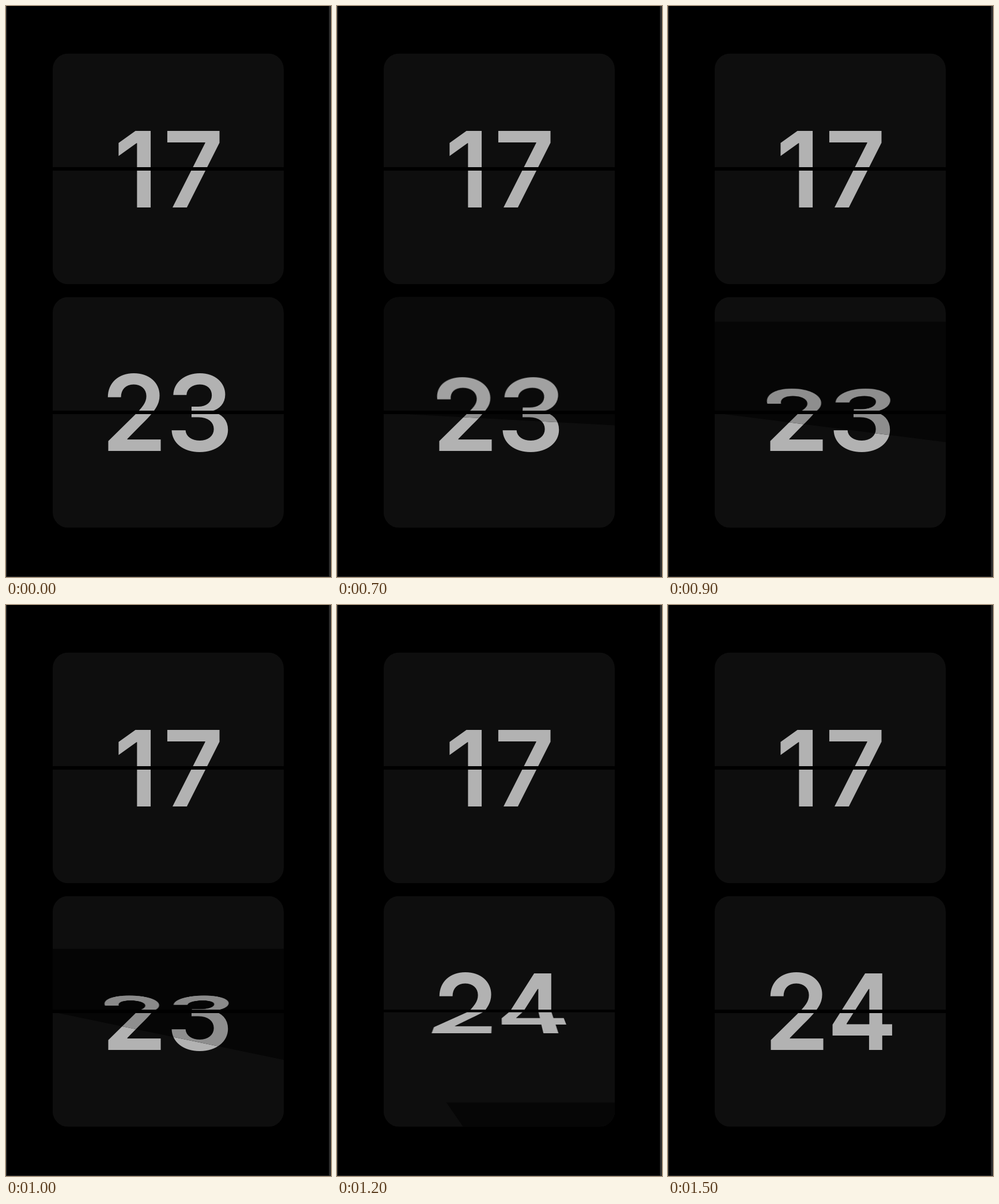
These frames come from a looping animation (564x992 px, 2 s). An HTML page with a canvas:

```html
<!DOCTYPE html>
<html lang="en">
<head>
<meta charset="utf-8">
<title>Flip clock</title>
<style>
  html, body { margin: 0; width: 100%; height: 100%; overflow: hidden; background: #000; }
  canvas { display: block; }
</style>
</head>
<body>
<canvas id="stage" width="564" height="992"></canvas>
<script>
const W = 564, H = 992, LOOP = 2000, STEP = 100;
const LEFT = 81, SIZE = 401, HALF = SIZE / 2, MID = LEFT + HALF, RADIUS = 27, GAP = 3;
const HOUR_Y = 283, MINUTE_Y = 706;
const ctx = document.getElementById('stage').getContext('2d');
const buffer = Object.assign(document.createElement('canvas'), { width: W, height: 404 });
const bufferCtx = buffer.getContext('2d');
const BUFFER_Y = buffer.height / 2;
ctx.imageSmoothingQuality = 'high';

// Optical centre of each digit
const centres = { 17: [223.5, 325.5], 23: [223, 336.5], 24: [224, 337] };
const grey = v => `rgb(${v},${v},${v})`;

function drawFace(c, cy, text, shade) {
  c.fillStyle = grey(14 - 8 * shade);
  c.fillRect(LEFT, cy - HALF, SIZE, SIZE);
  c.fillStyle = grey(178 - 36 * shade);
  c.font = '600 183px Inter, sans-serif';
  [...text].forEach((digit, i) => {
    const ink = c.measureText(digit);
    const offset = (ink.actualBoundingBoxRight - ink.actualBoundingBoxLeft) / 2;
    c.fillText(digit, centres[text][i] - offset, cy + 67);
  });
  drawGap(c, cy);
}

function drawGap(c, cy) {
  c.fillStyle = '#000';
  c.fillRect(LEFT, cy - GAP, SIZE, 2 * GAP);
}

function clipped(tracePath, draw) {
  ctx.save();
  ctx.beginPath();
  tracePath();
  ctx.clip();
  draw();
  ctx.restore();
}

function inCard(cy, draw) {
  clipped(() => ctx.roundRect(LEFT, cy - HALF, SIZE, SIZE, RADIUS), draw);
}

// Projects half a face, turned about the hinge; side is -1 for the upper half, 1 for the lower.
function drawFlap(cy, text, side, degrees, depth, shade) {
  bufferCtx.clearRect(0, 0, W, buffer.height);
  drawFace(bufferCtx, BUFFER_Y, text, shade);
  const angle = degrees * Math.PI / 180, cos = Math.cos(angle), sin = Math.sin(angle);
  const unproject = y => y * depth / (cos * depth + y * sin);
  for (let y = 0; y < HALF; y++) {
    const near = unproject(y), far = Math.min(unproject(y + 1), HALF);
    if (near >= HALF) break;
    const scale = depth / (depth - (near + far) / 2 * sin);
    const sourceY = side > 0 ? BUFFER_Y + near : BUFFER_Y - far;
    const targetY = side > 0 ? cy + y : cy - y - 1;
    ctx.drawImage(buffer, 0, sourceY, W, far - near,
      MID - MID * scale, targetY, W * scale, 1);
  }
}

// The cast shadow sweeps down from the left end of the hinge.
function drawShadow(cy, text, drop) {
  clipped(() => {
    ctx.moveTo(LEFT, cy + 1);
    ctx.lineTo(LEFT + SIZE, cy + 1);
    ctx.lineTo(LEFT + SIZE, cy + 1 + drop);
  }, () => drawFace(ctx, cy, text, 1));
}

function shadowDrop(degrees) {
  if (degrees > 90) return 580;
  const angle = degrees * Math.PI / 180;
  return 29 * Math.tan(angle) * (1 + 0.15 * Math.sin(2 * angle));
}

function drawMinutes(step) {
  const cy = MINUTE_Y;
  if (step < 0 || step > 7) return drawFace(ctx, cy, step < 0 ? '23' : '24', 0);

  const degrees = step < 7 ? 9 + 12 * step : 120;
  drawFace(ctx, cy, '24', 0);
  clipped(() => ctx.rect(LEFT, cy, SIZE, HALF), () => {
    drawFace(ctx, cy, '23', 0);
    drawShadow(cy, '23', shadowDrop(degrees));
  });
  if (degrees < 90) {
    const shade = Math.min(1.1, Math.max(0, (degrees - 12) / 45));
    drawFlap(cy, '23', -1, degrees, 550, shade);
    drawGap(ctx, cy);
  } else {
    drawFlap(cy, '24', 1, 180 - degrees, 475, 0);
  }
}

function drawWindowEdge() {
  ctx.fillStyle = '#303030';
  ctx.fillRect(0, 0, 1.5, H);
  ctx.fillRect(W - 3.5, 0, 3.5, H);
  ctx.fillRect(0, H - 1, W, 1);
}

function drawFrame(time) {
  ctx.fillStyle = '#000';
  ctx.fillRect(0, 0, W, H);
  drawWindowEdge();
  inCard(HOUR_Y, () => drawFace(ctx, HOUR_Y, '17', 0));
  inCard(MINUTE_Y, () => drawMinutes(Math.floor(time % LOOP / STEP) - 5));
}

const start = performance.now();
function tick() {
  drawFrame(performance.now() - start);
  requestAnimationFrame(tick);
}
tick();
</script>
</body>
</html>
```
